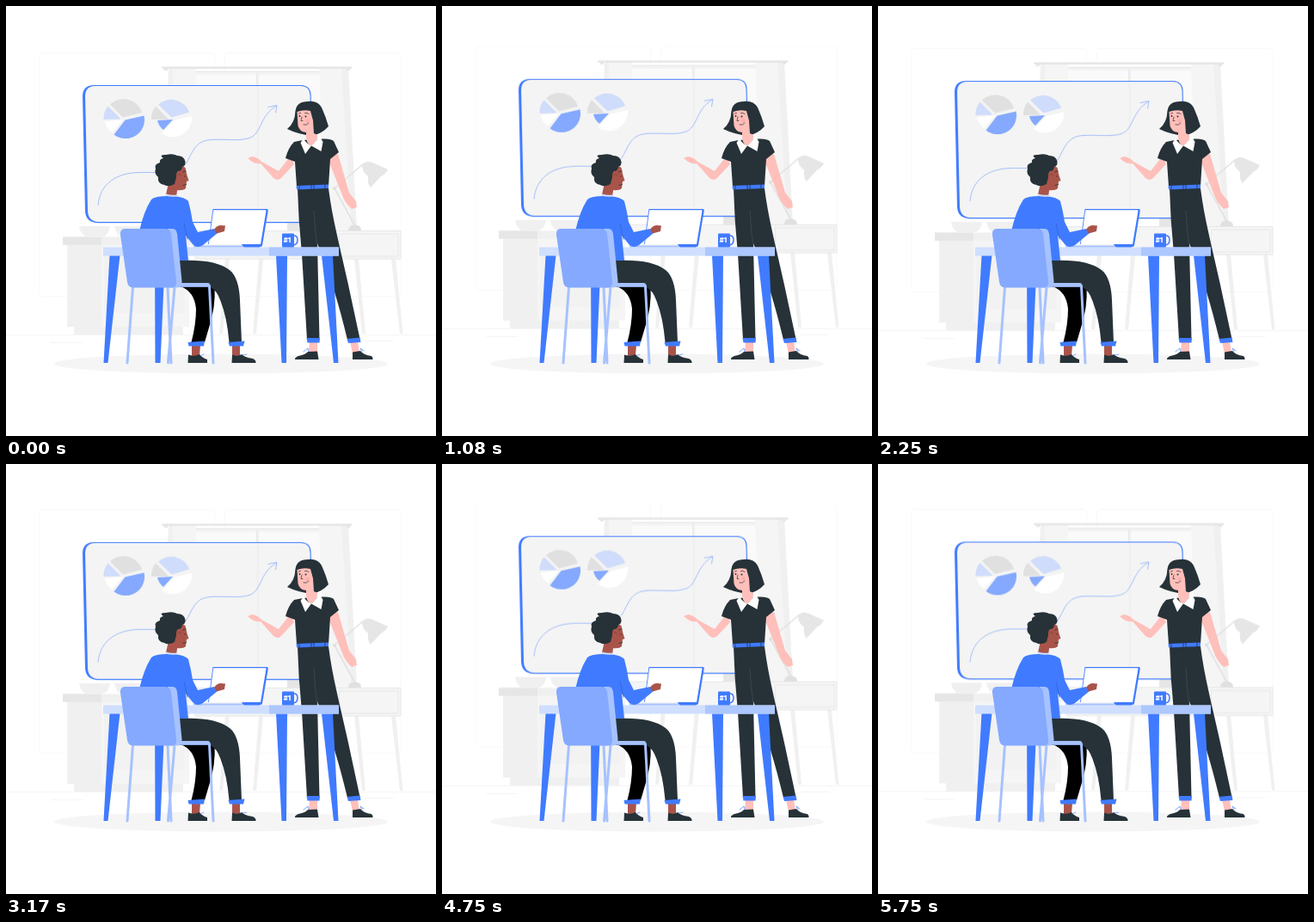
Animation, 500 px wide and 500 px high, one loop 5790 ms. Source, as an HTML page:

```html
<!DOCTYPE html>
<html lang="en">
<head>
<meta charset="utf-8">
<title>Office presentation</title>
<style>
  html, body { margin: 0; width: 100%; height: 100%; overflow: hidden; background: #fff; }
  svg { display: block; width: 100%; height: 100%; }
  .blue { fill: #407bff; }
  .mid { fill: #84a9ff; }
  .pale { fill: #a6c2ff; }
  .dark { fill: #263238; }
  .brown { fill: #a9544a; }
  .skin { fill: #ffbfba; }
  .white { fill: #fff; }
  .g1 { fill: #f5f5f5; }
  .g2 { fill: #f0f0f0; }
  .g3 { fill: #e6e6e6; }
  .g4 { fill: #e0e0e0; }
  .line { fill: none; stroke-linecap: round; stroke-linejoin: round; }
  .mug { font: 900 7.6px Inter, Roboto, sans-serif; fill: #fff; }
  .float { animation: float 5.79s linear infinite; }
  /* A 3 s bob of 10 px, cut off just short of its second return. */
  @keyframes float {
    0% { transform: translateY(0); }
    25.907% { transform: translateY(-10px); }
    51.813% { transform: translateY(0); }
    77.72% { transform: translateY(-10px); }
    100% { transform: translateY(-1.4px); }
  }
</style>
</head>
<body>
<svg viewBox="0 0 500 500">
  <g class="float">
    <g id="room">
      <g class="line" stroke="#f8f8f8" stroke-width=".8">
        <rect x="39" y="54.5" width="203.5" height="283" rx="3"/>
        <rect x="254.5" y="54.5" width="204.5" height="283" rx="3"/>
      </g>
      <path class="line" stroke="#f0f0f0" stroke-width=".7" d="M0 382.4H500M52 391.5H88M417 389.5H450M375 394H392"/>
    </g>

    <g id="window">
      <path fill="#fafafa" d="M220 80H388V244H220Z"/>
      <path fill="#f3f3f3" d="M220 75.5H366V80H220Z"/>
      <path class="line" stroke="#f0f0f0" stroke-width="3" d="M292.5 79V250M388 79V244M220 147H388"/>
      <path class="line" stroke="#e6e6e6" stroke-width=".8" d="M220 76.5H366M291.5 78V250"/>
      <path class="g1" d="M189 73H221L215 262H182Z"/>
      <path class="g1" d="M364 73H398L408 262H372Z"/>
      <path class="g2" d="M189 73H194L190 262H182ZM390 73H398L408 262H402Z"/>
      <rect class="g3" x="181" y="70.5" width="221.5" height="2.5" rx="1"/>
      <path class="g3" d="M184 73H188V75H184ZM396 73H400V75H396Z"/>
    </g>

    <g id="cabinet">
      <path class="g2" d="M71 277H111V373H71Z"/>
      <path class="g1" d="M111 277H213V373H111Z"/>
      <rect x="114" y="290" width="93" height="67" fill="#f2f2f2"/>
      <path class="g2" d="M79 373H206V382H79Z"/>
      <path class="g2" d="M66 268.5H220V277.8H66Z"/>
      <path class="g3" d="M66 268.5H111V277.8H66Z"/>
      <path class="g2" d="M85 256H121Q119 269 108 269H98Q87 269 85 256ZM126 256H162Q160 269 149 269H139Q128 269 126 256Z"/>
    </g>

    <g id="desk">
      <path class="g2" d="M294 294H299L291 381H287ZM255 294H260L252 381H248ZM405 294H410L418 381H414ZM448 294H453L461.5 381H458Z"/>
      <rect class="g1" x="219" y="261" width="240" height="33.5"/>
      <path class="line" stroke="#e8e8e8" d="M219 261.5H459V294H219M388 265H456V291H388Z"/>
      <rect class="g3" x="327" y="251" width="14" height="10"/>
      <path class="line" stroke="#e3e3e3" stroke-width="1.6" d="M406 256L382 212L415 184"/>
      <circle class="g4" cx="382" cy="212" r="2"/>
      <path class="g4" d="M398 261Q398 254.5 405.5 254.5Q413 254.5 413 261Z"/>
      <path class="g3" d="M414 185Q418 179 426 182L444 190Q441 196 436 198L424 211Q420 207 421 198Q414 193 414 185Z"/>
    </g>

    <g id="board">
      <path class="blue" d="M102 92H343Q354.5 92.5 354.6 104L358 240Q357 252.2 346 252.2H106Q93 251.5 92 239L89 105Q89 92.5 102 92Z"/>
      <path fill="#f4f4f4" d="M103 93.1H343Q353.4 93.6 353.5 104L356.9 240Q356 251.1 346 251.1H107Q96 250.5 95 239L92 105Q92 93.7 103 93.1Z"/>
      <path class="line" stroke="#efefef" stroke-width="2" d="M292.5 94V250"/>
      <path class="g4" d="M136 129.5L121 114.5A22.5 22.5 0 0 1 158 124Z"/>
      <path fill="#cfdcfb" d="M133.5 131.5L113.5 132A23 23 0 0 1 118.5 116.5Z"/>
      <path class="mid" d="M138.5 132.5L160.5 127.5A22 22 0 0 1 125.5 149.5Z"/>
      <path class="white" d="M136 132L114.5 134.5A22 22 0 0 0 123.5 147Z"/>
      <path fill="#cfdcfb" d="M192.5 129.5L177 114.5A22.5 22.5 0 0 1 213 123.5Z"/>
      <path class="g4" d="M189 131.5L169 132A23 23 0 0 1 174 116.5Z"/>
      <path class="mid" d="M194 132L176 133A18 18 0 0 0 183 144Z"/>
      <path class="white" d="M195 133L216 128A22 22 0 0 1 181 148Z"/>
      <path class="line" stroke="#a5bffa" d="M107 231.5C109 207 128 194 155 193.5C180 193 201 197 210 182C218 168 220 157 238 155.5C255 154.5 271 157.500 283 153.500C298 148 294 128 314.5 116M305 117.5L315 115.5L313.5 124"/>
    </g>
  </g>

  <ellipse class="g1" cx="250" cy="416" rx="194" ry="11.5"/>

  <g id="presenter">
    <path class="skin" d="M331 174L317 192L297 181Q293 176 286 175L281 177L286 181Q291 184 296 183L311 200Q316 204 320 200L335 184Z"/>
    <path class="skin" d="M374 174L386 172L399 217L407 227L408 234L402 236Q394 229 391 220L376 182Z"/>
    <path class="skin" d="M353 389H362V403H352ZM400 390H409L411 404H403Z"/>
    <path class="dark" d="M339 212H375C379 245 389 283 398 324L411.5 387L397 388C388 350 376 310 362 276L364.5 388H350L344 288Q340 250 339 212Z"/>
    <path class="line" stroke="#46545a" stroke-width=".6" d="M358 238Q359 260 362 279"/>
    <path class="blue" d="M349.5 386H365L364.5 391.5H350.5ZM396.5 387L411.5 385.5L412.5 391L398 392Z"/>
    <path class="dark" d="M351 402L362 401.5L363.5 411H336Q335.500 408 342 406.500Q348 405 351 402ZM403 402.500L412 401Q416 406 425 407Q427 409 426.5 411H403Z"/>
    <path class="line" stroke="#407bff" stroke-width=".7" d="M346 402L351 398L352 402M414 402L412 398L416 401"/>
    <path class="dark" d="M345 156L368 154.500Q378 154 381 157L387 170L377 178L375 210H338L336 181L325 177Q328 165 335 158Z"/>
    <path class="blue" d="M337.5 209L375 207.5V212L338 213.5Z"/>
    <path class="line" stroke="#263238" stroke-width=".8" d="M341 208V214M355 208V213M358 208V213M371 207V213"/>
    <path class="dark" d="M327 143Q336 136 336.5 122Q338 111 351 111Q362 109.500 367 118Q372 129 375 140Q368 148 356 151Q339 149 327 143Z"/>
    <path class="skin" d="M338.5 123Q346 120 354 122L357 133L358 148L362 150Q363 157 355 163Q348 160 349 147Q341 146 339.500 139Z"/>
    <path class="white" d="M346 154L342.500 159L348 172L355 162.500Q349 160 346 154ZM364 150L368.500 158L366.500 169L355 162.500Q361 158 364 150Z"/>
    <path class="line" stroke="#263238" stroke-width=".7" d="M340.500 125L342.500 124.500M347.500 124.500Q350 123.500 352 125.500M344 129L343 133.500H345M346 138Q349.500 139.500 352 136"/>
    <circle class="dark" cx="348.5" cy="128.500" r="1"/>
    <circle class="dark" cx="341.5" cy="128" r=".9"/>
    <circle cx="350.5" cy="133.5" r="2.2" fill="#ff9c98" opacity=".5"/>
  </g>

  <g id="table">
    <path class="blue" d="M120.5 290H132.5L118.5 415H113.5ZM173 290H185L179.5 415H173.5ZM314 290H327L326 415H320.5ZM367 290H380L386.5 415H381Z"/>
    <rect x="113" y="280.5" width="274" height="10" fill="#d0dfff"/>
    <path fill="#adc7ff" d="M306 280.5H387V290.5H306Z"/>
    <path class="blue" d="M240.500 236H303.5Q305 236 304.8 238L298 278.5Q297.5 280 295 280H276L274 277H235Z"/>
    <path class="white" d="M241.200 237.2H301.8Q302.6 237.2 302.4 238.4L296 277H235.800Z"/>
    <path class="pale" d="M218 278.500H274L277 280.5H218Z"/>
    <path class="blue" d="M274 277.500H297L295 280.5H277Z"/>
    <rect class="blue" x="321" y="264.5" width="14" height="16" rx="1"/>
    <path class="line" stroke="#407bff" stroke-width="1.5" d="M334 267H335.5Q339 267.5 339 272Q339 277.5 334 278"/>
    <text class="mug" x="327" y="274.8" text-anchor="middle">#1</text>
  </g>

  <g id="listener">
    <path class="brown" d="M216 394H226L225 407H216ZM263 394H272V407H263Z"/>
    <path d="M203 326H242.500Q244 350 236 374L231 391H215.500Q221 370 221 352Q219 332 203 326Z"/>
    <path class="dark" d="M180 296H203Q243 294 260 307Q271 316 272 342L274 391H259.500Q257 362 249.500 343Q245 330 237 327H202Z"/>
    <path class="blue" d="M211.5 391L231 389.5L230 395.5H212.5ZM258.5 391L277.5 389.5L276 395.5H260Z"/>
    <path class="dark" d="M212 405.500Q218 408 225 405Q228 409 234 411V415H211.5ZM263 405.500Q269 408 274 405Q278 409 287 410Q291 412 290.5 415H262.5Z"/>
    <path class="line" stroke="#407bff" stroke-width=".6" d="M226 407L230 405M275 406L280 405"/>
    <path class="brown" d="M189 206L200 207L198 222Q190 224 186 219Z"/>
    <path class="blue" d="M169 225Q173 221 188 221Q207 221 212 227Q215 238 217 251L223 263L242 259L246 264L229 278Q223 282 218 278L209 267L212 296H155V262Q160 239 169 225Z"/>
    <path class="line" stroke="#d0dfff" stroke-width="2" d="M186 219.500Q192 221.500 198.500 220.500"/>
    <path class="line" stroke="#3264d8" stroke-width=".8" d="M207 253Q209 262 211 271"/>
    <path class="brown" d="M242 260Q245 255 250 255L255 255.5L254 262L245 264.5Z"/>
    <path class="brown" d="M197 188Q204 184 208.500 188L210.5 197L212.5 203L210 204L209 212Q206 215 198 214L192 208Z"/>
    <path class="dark" d="M183 177Q177 173 186 173Q194 171 199 174Q207 174 208.5 181Q209 186 205 187Q205 190 202 192Q198 190 198 199L196 207Q189 211 184 208Q176 207 177 199Q172 195 174 189Q172 184 179 182Q178 178 183 177Z"/>
    <ellipse class="brown" cx="201.5" cy="197" rx="3" ry="4"/>
    <path class="line" stroke="#263238" stroke-width=".8" d="M205.5 193L209 192M208 197.5V198.5M206 208.5L209.5 207.5"/>
    <path class="line" stroke="#7d3328" stroke-width=".6" d="M200 196Q202 194 203 197"/>
  </g>

  <g id="chair">
    <path class="line" stroke="#a6c2ff" stroke-width="3" d="M147.5 327L141 415M188 327L192 415M196 327L188.5 415M236.500 326L241 415"/>
    <path class="pale" d="M200 322H234.500Q237.500 322 238 326.800H200Z"/>
    <path class="pale" d="M188 259H194Q198 259 199 265L204.5 320Q205 327.5 199 327.5H190Z"/>
    <path class="mid" d="M138 259H185Q191 259 192 265L198 320Q198.5 327.5 193 327.5H148Q142 327.5 141 321L133 266Q132.5 259 138 259Z"/>
  </g>
</svg>
</body>
</html>
```
